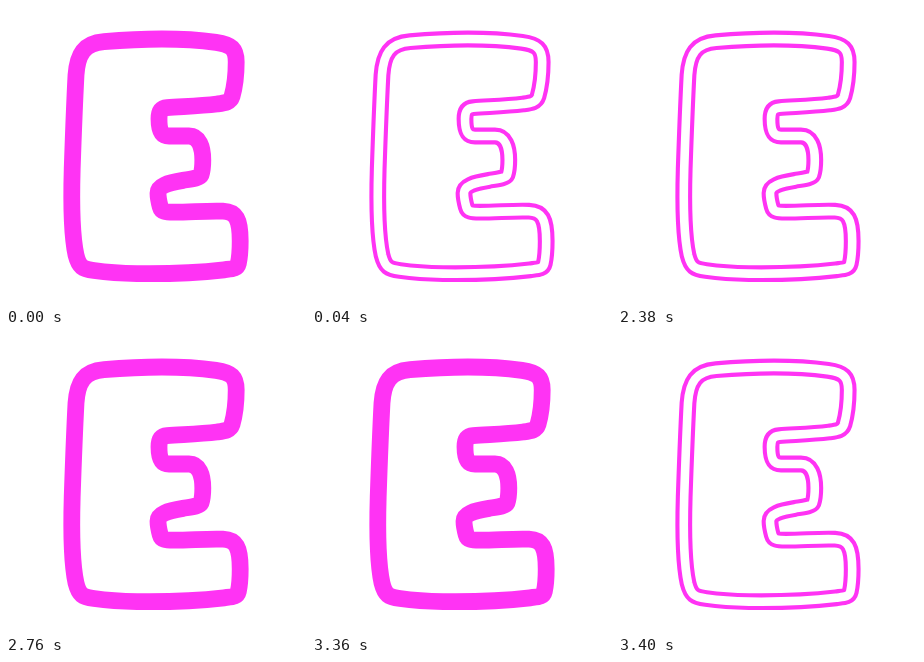
Write an HTML page with a canvas that moves like this. It is 300x300 px and loops after 3600 ms.

```html
<!DOCTYPE html>
<html lang="en">
<head>
<meta charset="utf-8">
<title>Neon letter</title>
<style>
  html, body { margin: 0; width: 100%; height: 100%; overflow: hidden; background: #fff; }
  canvas { display: block; width: 100vw; height: 100vh; }
</style>
</head>
<body>
<canvas id="stage" width="300" height="300"></canvas>
<script>
const ctx = document.getElementById('stage').getContext('2d');
const LOOP = 3600;
const FLASH = 40;
const flashes = [0, 2340, 2760, 3360];

// Centre line of the tube, clockwise from the top left
const letter = new Path2D(`
  M 98 35.7
  C 134 32.6 178 32 210 36.3
  C 225.5 38.4 230.2 43 230.2 56
  C 230.2 68 229 80 226 90.5
  C 224 96.6 219 97 211 98
  C 194 100 177 100.5 161 101.7
  C 155 102.2 153 106 153 113
  C 153 126 156 130 163 130
  L 183 130
  C 193 130 196.8 141 196.8 154
  C 196.8 160 196.3 165 195 169
  C 193.7 172 187 172.7 177 174.4
  C 161 177 152 180 152 187
  C 152 192 153.2 197 154.3 201
  C 155.5 205.7 159 206 168 206.2
  C 185 206.2 201 204.6 217 205.2
  C 230 205.7 234.2 213 234.2 235
  C 234.2 243 233.8 251 232.3 257.5
  C 231 263 226 262.8 218 263.8
  C 192 266.8 160 268 131 267.6
  C 115 267.3 101 266.3 88 264.5
  C 76.5 263 73 261 70 249
  C 65 226 65.3 194 66.2 163
  C 67.3 130 68.5 98 70 69
  C 71.5 48 78 37.3 98 35.7
  Z`);

function trace(color, width) {
  ctx.strokeStyle = color;
  ctx.lineWidth = width;
  ctx.stroke(letter);
}

function draw(t) {
  const lit = flashes.some(start => t >= start && t < start + FLASH);
  ctx.fillStyle = '#fff';
  ctx.fillRect(0, 0, 300, 300);
  ctx.lineJoin = 'round';
  trace('#ff33f4', 16.8);
  if (!lit) trace('#fff', 8.6);
}

const begin = performance.now();
function tick() {
  draw((performance.now() - begin) % LOOP);
  requestAnimationFrame(tick);
}
tick();
</script>
</body>
</html>
```
